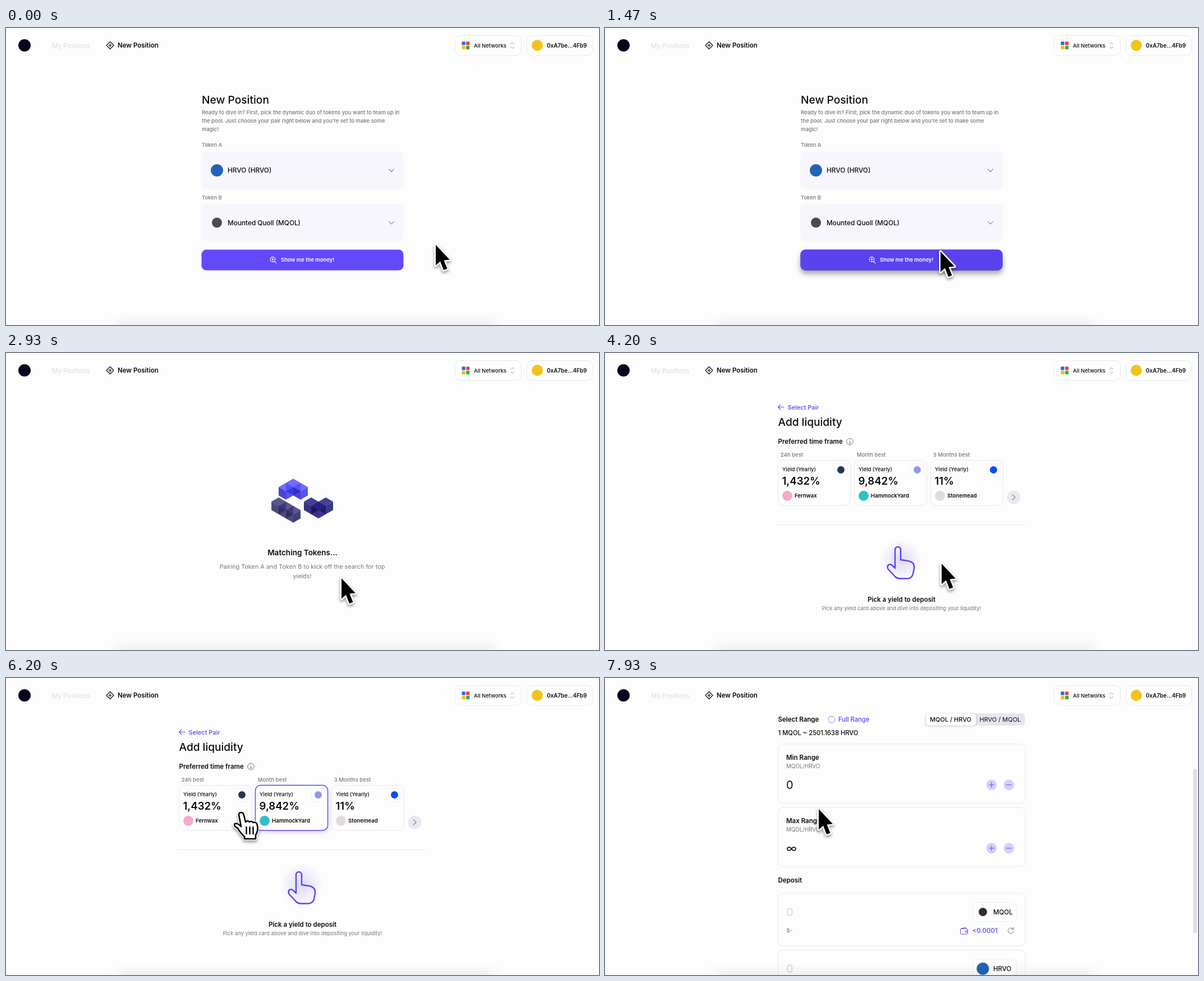
These frames come from a looping animation (1057x530 px, 8 s). An HTML page:

```html
<!DOCTYPE html>
<html lang="en">
<head>
<meta charset="utf-8">
<title>New Position</title>
<style>
html, body { margin: 0; width: 100%; height: 100%; overflow: hidden; background: #fdfdfd; }
#stage { position: relative; width: 100%; height: 100%; overflow: hidden; contain: strict; }
svg, #bar { position: absolute; left: 0; top: 0; }
#bar { width: 100%; height: 62px; background: rgba(253,253,253,.82); backdrop-filter: blur(3px); }
#dock { position: absolute; left: 200px; bottom: 0; width: 670px; height: 0; box-shadow: 0 0 17px 1px rgba(50,45,80,.55); }
text { font-family: Inter, sans-serif; white-space: pre; }
</style>
</head>
<body>
<div id="stage">
<svg id="page" width="1057" height="530"></svg>
<div id="bar"></div>
<div id="dock"></div>
<svg id="top" width="1057" height="530"></svg>
</div>
<script>
const LOOP = 8000, PURPLE = '#5b47ef', GREY = '#77777d', INK = '#0b0b0d', LINE = '#e9e8ee';
const COIN_A = 'HRVO', COIN_B = 'MQOL';
const $ = id => document.getElementById(id);

// y is the middle of the capitals
const text = (x, y, size, str, weight = 500, fill = INK, anchor = 'start') =>
  `<text x="${x}" y="${y + size * .364}" font-size="${size}" font-weight="${weight}" fill="${fill}" text-anchor="${anchor}">${str}</text>`;
const rect = (x, y, w, h, r, fill, stroke = 'none', more = '') =>
  `<rect x="${x}" y="${y}" width="${w}" height="${h}" rx="${r}" fill="${fill}" stroke="${stroke}" ${more}/>`;
const dot = (x, y, r, fill, more = '') => `<circle cx="${x}" cy="${y}" r="${r}" fill="${fill}" ${more}/>`;
const line = (d, stroke, width = 1.2, more = '') =>
  `<path d="${d}" fill="none" stroke="${stroke}" stroke-width="${width}" stroke-linecap="round" stroke-linejoin="round" ${more}/>`;
const group = (id, body, more = '') => `<g id="${id}" ${more}>${body}</g>`;
const shadow = (y, blur, alpha) => `style="filter:drop-shadow(0 ${y}px ${blur}px rgba(0,0,0,${alpha}))"`;

// Pair selection
const picker = (y, label, color, r, name) =>
  text(349, y - 45, 9.4, label, 500, GREY) +
  rect(348.5, y - 33.3, 360, 66.6, 8, '#f7f6fc') +
  dot(376, y, r, color) + text(395, y, 11.8, name) +
  line(`M682.5 ${y - 2}l4.5 4.5 4.5-4.5`, '#8b8b92');
const button = (fill, more) => rect(348.5, 395.5, 360, 37, 8.5, fill, 'none', more);

const pair = group('pair',
  text(349, 128.5, 19.2, 'New Position', 500) +
  ['Ready to dive in? First, pick the dynamic duo of tokens you want to team up in',
   'the pool. Just choose your pair right below and you’re set to make some',
   'magic!'].map((s, i) => text(349, 151 + i * 14.8, 9.5, s, 500, GREY)).join('') +
  picker(254, 'Token A', '#2263b8', 11, `${COIN_A} (${COIN_A})`) +
  picker(347.3, 'Token B', '#4b4b50', 9, `Mounted Quoll (${COIN_B})`) +
  button('#6349fa') +
  group('hover', button('#5a43ee', shadow(6, 5, .35))) +
  line('M478.6 416.5l3.2 3.2M473.4 413h4.2M475.5 410.9v4.2', '#fff', 1.1) +
  dot(475.5, 413, 4.4, 'none', 'stroke="#fff" stroke-width="1.1"') +
  text(490, 414, 9.45, 'Show me the money!', 600, '#fff'));

// Loader: two corners and a bar that close into a 3 by 3 slab
const cube = (i, j, [lid, left, right]) => {
  const x = 528 + (i - j) * 13, y = 241 + (i + j) * 7.5;
  return `<g fill-opacity=".85"><path fill="${lid}" d="M${x} ${y - 7.5}l13 7.5-13 7.5-13-7.5z"/>` +
    `<path fill="${left}" d="M${x - 13} ${y}l13 7.5v15l-13-7.5z"/>` +
    `<path fill="${right}" d="M${x + 13} ${y}l-13 7.5v15l13-7.5z"/></g>`;
};
const pieces = [
  { cells: [[0, 0], [0, 1], [1, 0]], dir: [-1, 0], tone: ['#5653ff', '#2a26c4', '#3a36ef'] },
  { cells: [[1, 1], [2, 0], [2, 1]], dir: [1, 0], tone: ['#241f80', '#161062', '#1a1570'] },
  { cells: [[0, 2], [1, 2], [2, 2]], dir: [0, 1], tone: ['#3c3978', '#2d2a66', '#211d5c'] }
];
const loader = group('loader',
  pieces.map((p, n) => group('piece' + n, p.cells.map(([i, j]) => cube(i, j, p.tone)).join(''))).join('') +
  text(528.5, 356, 13.5, 'Matching Tokens...', 600, INK, 'middle') +
  text(528, 381, 10.85, 'Pairing Token A and Token B to kick off the search for top', 400, GREY, 'middle') +
  text(528, 398, 10.85, 'yields!', 400, GREY, 'middle'));

// Yield cards
const card = (n, label, rate, name, chain, venue) => {
  const x = 308 + n * 136;
  return text(x + 4.7, 181.5, 9.6, label, 500, GREY) +
    rect(x + .5, 191.5, 129, 80.5, 9, '#fdfdfe', LINE, `id="card${n}"`) +
    rect(x + 100.5, 197, 24, 24, 5, '#fff', '#f0eff4') +
    dot(x + 112.5, 208.5, 6.5, chain) +
    text(x + 8, 207.5, 9.4, 'Yield (Yearly)') +
    text(x + 7.5, 228.5, 18.6, rate, 600) +
    dot(x + 17, 254.8, 9, venue) +
    text(x + 30, 255, 9.6, name, 600);
};
const cards =
  line('M319 96.5h-10.5m4-4l-4 4 4 4', PURPLE) +
  text(325.5, 96.5, 11, 'Select Pair', 500, PURPLE) +
  text(308.5, 123, 19.1, 'Add liquidity', 500) +
  text(308.5, 158, 11.5, 'Preferred time frame', 600) +
  dot(436.5, 158, 5.8, 'none', `stroke="${GREY}"`) +
  line('M436 157h.7v4M435.3 161h2.8M436.5 154.6v.1', GREY, 1) +
  card(0, '24h best', '1,432%', 'Fernwax', '#21364f', '#f7a9cb') +
  card(1, 'Month best', '9,842%', 'HammockYard', '#8f9be6', '#32bfc4') +
  card(2, '3 Months best', '11%', 'Stonemead', '#0a4bff', '#e3dcd8') +
  dot(728.5, 257.5, 12, '#eae8f0') + line('M726.5 253l4.5 4.5-4.5 4.5', '#85858c') +
  line('M308 306.5H749', LINE, 1);

const prompt = group('prompt',
  dot(527, 370, 38, 'url(#halo)') +
  line('M517 384V351a5 5 0 0 1 10 0V369L540 371Q552 373 551 384L549 394Q547 402.5 539 402.5H525Q520 402 517 399L504.5 385.5Q502 379.5 506.5 377.5Q510 376.5 513 380Z', PURPLE, 2.5) +
  text(528.5, 439.5, 11.5, 'Pick a yield to deposit', 600, INK, 'middle') +
  text(528.5, 455.5, 9.4, 'Pick any yield card above and dive into depositing your liquidity!', 400, GREY, 'middle'));

// Range and deposit form
const knob = (x, y, d) => dot(x, y, 9.5, '#d8d0fa') + line(d, PURPLE, 1.1, `transform="translate(${x} ${y})"`);
const rangeBox = (y, title, value) =>
  rect(308.5, y, 440.5, 106, 9, '#fdfdfe', LINE) +
  text(323, y + 24, 11.5, title, 600) +
  text(323, y + 40, 9.8, `${COIN_B}/${COIN_A}`, 400, GREY) +
  text(323, y + 73, 20, value, 400) +
  knob(689, y + 73, 'M-4.5 0h9M0-4.5v9') + knob(720, y + 73, 'M-4.5 0h9');
const depositBox = (y, coin, color, r) =>
  rect(308.5, y, 440.5, 94, 9, '#fdfdfe', LINE) +
  text(323, y + 33.5, 20, '0', 400, '#d6d6dc') +
  rect(655.5, y + 16.5, 78, 34, 8, '#fff', '#efeef3') +
  dot(673.5, y + 33.5, r, color) + text(692, y + 33.5, 11.5, coin) +
  text(323.5, y + 67, 9.6, '$-', 400, GREY) +
  rect(633.5, y + 63.5, 13, 9.5, 2, 'none', PURPLE) +
  line(`M634 ${y + 63.5}l9-2.5v2.5M646.5 ${y + 67}h-4v2.5h4`, PURPLE, 1) +
  text(654.5, y + 67, 11.6, '&lt;0.0001', 500, PURPLE) +
  line(`M727.5 ${y + 64}a5 5 0 1 0 .8 4M728 ${y + 61}v3.5h-3.5`, GREY, 1);

const form = group('form',
  text(308.5, 353.8, 11.5, 'Select Range', 600) +
  dot(404, 353.8, 5.8, 'none', 'stroke="#8d80f2"') +
  text(416, 353.8, 11.2, 'Full Range', 500, PURPLE) +
  rect(571, 343, 177.5, 21.5, 5, '#e7e5ec') +
  rect(572, 343, 89, 21.5, 5, '#fff', 'none', shadow(1, 2, .2)) +
  text(579, 354, 11, `${COIN_B} / ${COIN_A}`) +
  text(667.5, 354, 11, `${COIN_A} / ${COIN_B}`, 400) +
  rect(308.5, 373.5, 217, 9, 2, '#ebe9f5', 'none', 'id="skeleton"') +
  group('price', text(308.5, 377.7, 11.2, `1 ${COIN_B} ~ 2501.1638 ${COIN_A}`)) +
  rangeBox(397.5, 'Min Range', '0') + rangeBox(510.5, 'Max Range', '∞') +
  text(308.5, 640.3, 11.5, 'Deposit', 600) +
  depositBox(663.7, COIN_B, '#3a2b33', 7.5) + depositBox(765, COIN_A, '#2263b8', 11));

$('page').innerHTML =
  `<defs><radialGradient id="halo"><stop stop-color="${PURPLE}" stop-opacity=".2"/>
   <stop offset="1" stop-color="${PURPLE}" stop-opacity="0"/></radialGradient></defs>` +
  pair + loader + group('pool', cards + prompt + form);

// Header, scroll bar and pointers
const header =
  dot(33, 31, 11, '#08031c') +
  text(82, 31.5, 11.5, 'My Positions', 300, '#d2d2d6') +
  line('M185.5 24.5l6.5 6.5-6.5 6.5-6.5-6.5zM182.8 31h5.4M185.5 28.3v5.4', INK, 1.2) +
  text(199, 31.2, 11.5, 'New Position', 600) +
  rect(800.5, 13.5, 118, 35.5, 9, '#fefefe', LINE) +
  [['#1a6cf0', 0, 0], ['#ea4335', 1, 0], ['#fbbc04', 0, 1], ['#34a853', 1, 1]]
    .map(([c, i, j]) => rect(812.5 + i * 7.6, 24.2 + j * 7.6, 6.2, 6.2, 1.2, c)).join('') +
  text(834, 31.2, 9.5, 'All Networks') +
  line('M899.5 29l3-3 3 3M899.5 33.5l3 3 3-3', '#a0a0a6', 1) +
  rect(928.5, 13.5, 117, 35.5, 9, '#fefefe', LINE) +
  dot(947, 31, 10, '#f2c41b') +
  text(964, 31.2, 9.9, '0xA7be...4Fb9', 600);
const outlined = (d, fill, width, ink) =>
  `<path d="${d}" fill="#fff" stroke="#fff" stroke-width="${width}" stroke-linejoin="round"/>` +
  `<path d="${d}" fill="${fill}" stroke="#000" stroke-width="${ink}" stroke-linejoin="round"/>`;
const cursor = group('cursor',
  group('arrow', outlined('M0 0V36.5L8 29.5 14 45 20.5 42.5 14.5 27.5 25 26.5Z', '#000', 5, 0)) +
  group('hand', outlined('M-4 3Q-4-1 0-1Q4-1 5 4L8 16Q12 12 15 16Q19 13 21.5 17Q28 15 29 22Q31 32 26 39V46H6V42Q-1 36-6 27Q-14 23-11 19Q-7 17 0 24Z', '#fff', 5.5, 2.6) +
    line('M9.5 25v12M15.5 25v12M21.5 25v12', '#000', 2.4)),
  shadow(3, 2.5, .4));
$('top').innerHTML = header + rect(1048.5, 162, 6.5, 293, 3.2, '#dddde2', 'none', 'id="thumb"') + cursor;

// Eased value between [time, value] keys
function track(keys, t) {
  if (t <= keys[0][0]) return keys[0][1];
  for (let n = 1; n < keys.length; n++) {
    const [t0, a] = keys[n - 1], [t1, b] = keys[n];
    if (t < t1) {
      const k = (t - t0) / (t1 - t0);
      return a + (b - a) * k * k * (3 - 2 * k);
    }
  }
  return keys[keys.length - 1][1];
}
const pathX = [[250, 766], [1350, 598], [3900, 598], [4200, 600], [4950, 500], [5950, 500], [6200, 419], [6550, 381]];
const pathY = [[250, 387], [1350, 399], [1800, 399], [2100, 402], [3900, 402], [4200, 376], [4950, 246], [5950, 246], [6200, 241], [6550, 234]];
const scrollKeys = [[7080, 0], [7400, 102.3], [7530, 102.3], [7930, 279.7]];

const show = (id, on) => $(id).style.display = on ? '' : 'none';
const move = (id, x, y) => $(id).setAttribute('transform', `translate(${x} ${y})`);
const LOAD = 1900, READY = 3850, PICK = 7000;

function draw(t) {
  show('pair', t < LOAD);
  show('loader', t >= LOAD && t < READY);
  show('pool', t >= READY);
  show('prompt', t < PICK);
  show('form', t >= PICK);
  show('skeleton', t < 7600);
  show('price', t >= 7600);
  $('hover').style.opacity = track([[1050, 0], [1250, 1]], t);

  const gap = 1.23 * (1 - Math.cos((t - LOAD) / 1030 * Math.PI)) / 2;
  pieces.forEach(({ dir: [i, j] }, n) => move('piece' + n, gap * (i - j) * 13, gap * (i + j) * 7.5));

  const scroll = track(scrollKeys, t);
  move('pool', 0, -scroll);
  $('thumb').setAttribute('y', 162 - (279.7 - scroll) * .57);
  $('thumb').style.opacity = track([[7540, 0], [7680, 1]], t);

  const x = track(pathX, t), y = track(pathY, t);
  const hot = t < READY || y > 272 ? -1 : x < 418 ? 0 : 1;
  [0, 1].forEach(n => {
    const box = $('card' + n), picked = n === 0 && t >= PICK, on = picked || (hot === n && t < PICK);
    box.setAttribute('stroke', on ? PURPLE : LINE);
    box.setAttribute('stroke-width', on ? 1.4 : 1);
    box.setAttribute('fill', picked ? '#eeecf9' : '#fdfdfe');
    box.style.filter = on && !picked ? 'drop-shadow(2px 3px 4px rgba(91,71,239,.2))' : '';
  });
  const hand = hot >= 0 && t < 7180;
  show('hand', hand);
  show('arrow', !hand);
  move('cursor', x, y);
}
function tick(now) {
  draw(now % LOOP);
  requestAnimationFrame(tick);
}
draw(0);
requestAnimationFrame(tick);
</script>
</body>
</html>
```
